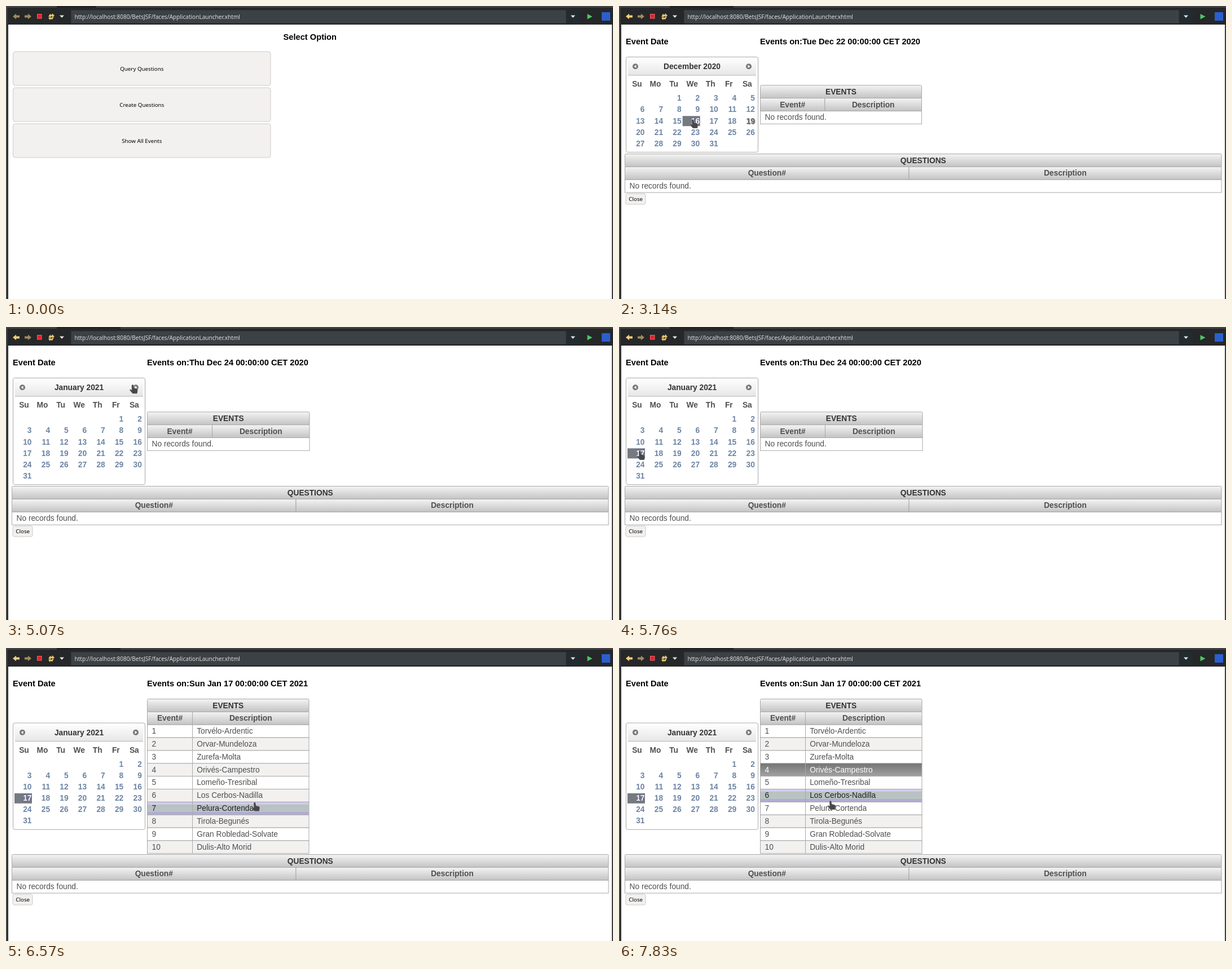
Write an HTML page that moves like this. It is 1076 px wide and 520 px high and loops after 8000 ms.

```html
<!DOCTYPE html>
<html lang="en">
<head>
<meta charset="utf-8">
<style>
html, body { margin: 0; width: 100%; height: 100%; overflow: hidden; background: #fff; }
svg { display: block; width: 1076px; height: 520px; }
text { font: 13.75px "Liberation Sans", Arial, sans-serif; fill: #4f4f4f; white-space: pre; }
.b { font-weight: bold; }
.h { font-weight: bold; font-size: 14.667px; fill: #000; }
.title { font-weight: bold; fill: #333; }
.ui { font: 9.78px "Noto Sans", sans-serif; fill: #000; }
.url { font: 10.07px "Noto Sans", sans-serif; fill: #dcdddd; }
.day { font-weight: bold; fill: #6c84a4; }
.today { font-weight: bold; fill: #626b70; text-shadow: 1px 1px 1px #888; }
.on { font-weight: bold; fill: #fff; text-shadow: 0 0 2px #4a3fa0; }
.hot { fill: #222; }
.sel { fill: #fff; }
</style>
</head>
<body>
<svg viewBox="0 0 1076 520">
  <defs>
    <linearGradient id="bar" x2="0" y2="1"><stop stop-color="#f4f4f4"/><stop offset="1" stop-color="#c3c3c3"/></linearGradient>
    <linearGradient id="soft" x2="0" y2="1"><stop stop-color="#fdfdfd"/><stop offset="1" stop-color="#e6e6e6"/></linearGradient>
    <linearGradient id="hover" x2="0" y2="1">
      <stop stop-color="#d6d0f3"/><stop offset=".2" stop-color="#cdc9ea"/><stop offset=".2" stop-color="#b8c2c1"/>
      <stop offset=".76" stop-color="#bac3c3"/><stop offset=".76" stop-color="#b0abd4"/><stop offset="1" stop-color="#b0abd6"/>
    </linearGradient>
    <linearGradient id="picked" x2="0" y2="1"><stop stop-color="#747474"/><stop offset="1" stop-color="#a2a2a2"/></linearGradient>
  </defs>
  <rect width="1076" height="520" fill="#fff"/>
  <rect width="1076" height="33" fill="#252729"/>
  <rect width="1076" height="3" fill="#3f4143"/>
  <rect id="tab" x="90" width="70" height="3" fill="#222426"/>
  <path d="M0 0h2v520H0zM1075 33h1v487h-1z" fill="#47494b"/>
  <path d="M2 3h2v517H2zM1074 33h1v487h-1z" fill="#292b2d"/>
  <path id="back" d="M12 18.500l6-5v3h6v4h-6v3z" fill="#a08a5c"/>
  <path d="M45 18.500l-6-5v3h-6v4h6v3z" fill="#a08a5c"/>
  <rect x="55.500" y="14.500" width="7.500" height="7.500" fill="#e8202a" stroke="#f0666a"/>
  <path d="M75 19l3-5 3 2 1-3 4 4-4 3v-2l-3 1zM85 19l-3 5-3-1-1 2-3-4 4-2v2l3-1z" fill="#e8c56c"/>
  <path d="M95 16.500h8l-4 4.500z" fill="#e4e4e4"/>
  <rect x="115.500" y="7.500" width="877" height="23" fill="#3c4146" stroke="#34383c"/>
  <rect x="993" y="7" width="24" height="24" fill="#222b30"/>
  <path d="M1001 16.500h8l-4 4.500z" fill="#e4e4e4"/>
  <text class="url" x="121.500" y="22.500">http://localhost:8080/BetsJSF/faces/ApplicationLauncher.xhtml</text>
  <path d="M1030.500 14l9 4.700-9 4.700z" fill="#4cc764"/>
  <rect id="busy" x="1056" y="11" width="15" height="15"/>
  <g id="page"></g>
  <path id="hand" d="M-2 1q2-2 3.500 0l.8 5 5 1.200q2 .6 1.700 2.600l-1 6.200h-8l-4.500-5q-1.600-2-.4-2.600 1-.5 3.200 1.400z" fill="#474747" stroke="#fff" stroke-opacity=".45" stroke-width=".6"/>
</svg>
<script>
const LOOP = 8000, ROW = 22.85, LINE = '#a8a8a8';
const $ = id => document.getElementById(id);

const matches = ['Torvélo-Ardentic', 'Orvar-Mundeloza', 'Zurefa-Molta', 'Orivés-Campestro', 'Lomeño-Tresribal',
  'Los Cerbos-Nadilla', 'Pelura-Cortenda', 'Tirola-Begunés', 'Gran Robledad-Solvate', 'Dulis-Alto Morid'];

// Pointer path: time, x, y of the fingertip
const path = [
  [780, 268, 158], [820, 211, 110], [1380, 211, 110], [1940, 77, 250], [2130, 67, 264],
  [2200, 67, 264], [2340, 102, 221], [2460, 102, 221], [2620, 126, 204],
  [2840, 126, 204], [2920, 131, 201], [3140, 131, 201], [3260, 134, 202], [3610, 167, 225],
  [3960, 167, 225], [4130, 349, 234], [4350, 349, 234], [4700, 220, 93], [4850, 225, 102],
  [5070, 225, 102], [5520, 37, 220], [5860, 37, 220], [6130, 402, 205], [6520, 441, 273.5],
  [6570, 441, 273.5], [6780, 428, 324], [7120, 404, 146], [7330, 404, 146], [7410, 400, 222],
  [7620, 400, 222], [7830, 375, 271]
];

// Calendar states: time, month, active day, date shown
const states = [
  [1980, 0, 0, ''], [2380, 0, 22, ''], [2470, 0, 22, 'Tue Dec 22'], [3140, 0, 16, 'Tue Dec 22'],
  [3230, 0, 16, 'Wed Dec 16'], [3960, 0, 24, 'Wed Dec 16'], [4050, 0, 24, 'Thu Dec 24'],
  [5070, 1, 0, 'Thu Dec 24'], [5760, 1, 17, 'Thu Dec 24'], [5880, 1, 17, 'Sun Jan 17']
];
const months = [{ name: 'December 2020', first: 2, rows: 5 }, { name: 'January 2021', first: 5, rows: 6 }];
const dateWidth = { Tue: 286, Wed: 291, Thu: 287.5, Sun: 286.5 };

const text = (s, x, y, cls = '', anchor = 'start') =>
  `<text x="${x}" y="${y}" class="${cls}" text-anchor="${anchor}">${s}</text>`;
const mid = (s, x, y, cls) => text(s, x, y, cls, 'middle');
const rect = (x, y, w, h, fill, stroke = 'none', r = 0) =>
  `<rect x="${x}" y="${y}" width="${w}" height="${h}" fill="${fill}" stroke="${stroke}" rx="${r}"/>`;

function pointer(t) {
  if (t < path[0][0]) return null;
  const i = path.findIndex(p => p[0] > t);
  if (i < 0) return path[path.length - 1].slice(1);
  const [t0, x0, y0] = path[i - 1], [t1, x1, y1] = path[i];
  const k = (t - t0) / (t1 - t0);
  return [x0 + (x1 - x0) * k, y0 + (y1 - y0) * k];
}

function menu(focus) {
  let s = mid('Select Option', 538.8, 59.5, 'h');
  ['Query Questions', 'Create Questions', 'Show All Events'].forEach((label, i) => {
    const y = 81 + 64 * i, lit = focus && !i;
    s += rect(12.5, y, 456.5, 60, lit ? '#f9f9f9' : '#f2f1f0', '#cec9c5', 4);
    if (lit) s += rect(14, y + 1.5, 453.5, 57, 'none', '#d2cfcc', 2);
    s += mid(label, 240.8, y + 34.3, 'ui');
  });
  return s;
}

function head(x, y, w, split, title, cols) {
  return rect(x, y, w, ROW, 'url(#bar)', LINE, 2) + mid(title, x + w / 2, y + 16, 'title') +
    rect(x, y + ROW, split, ROW, 'url(#bar)', LINE) +
    rect(x + split, y + ROW, w - split, ROW, 'url(#bar)', LINE) +
    mid(cols[0], x + split / 2, y + ROW + 16, 'b') +
    mid(cols[1], x + (w + split) / 2, y + ROW + 16, 'b');
}

function emptyTable(x, y, w, split, title, cols) {
  return head(x, y, w, split, title, cols) + rect(x, y + 2 * ROW, w, ROW, '#fff', LINE) +
    text('No records found.', x + 8, y + 2 * ROW + 15.8);
}

function eventTable(x, y, w, hot, picked) {
  let s = head(x, y, w, 80, 'EVENTS', ['Event#', 'Description']);
  matches.forEach((m, i) => {
    const ry = y + ROW * (i + 2);
    const cls = i === picked ? 'sel' : i === hot ? 'hot' : '';
    const fill = cls === 'sel' ? 'url(#picked)' : cls ? 'url(#hover)' : i % 2 ? '#f2f1f0' : '#fff';
    s += rect(x, ry, w, ROW, fill, LINE) + `<path d="M${x + 80} ${ry}v${ROW}" stroke="${LINE}"/>` +
      text(i + 1, x + 8, ry + 15.8, cls) + text(m, x + 87.7, ry + 15.8, cls);
  });
  return s;
}

function calendar(y, month, active) {
  const { name, first, rows } = months[month];
  let s = rect(12.5, y, 234, 68.5 + 20.1 * rows, '#fff', LINE, 3) +
    rect(16, y + 3.5, 227, 29, 'url(#soft)') +
    `<path d="M16 ${y + 32.5}h227" stroke="#b4b4b4"/>` + mid(name, 129.5, y + 21.8, 'title');
  [[29, -1], [230, 1]].forEach(([x, d]) => {
    s += `<circle cx="${x}" cy="${y + 16.8}" r="5" fill="#787878"/>` +
      `<path d="M${x + 2.5 * d} ${y + 16.8}l${-4 * d} -2.800v5.600z" fill="#fff"/>`;
  });
  ['Su', 'Mo', 'Tu', 'We', 'Th', 'Fr', 'Sa'].forEach((d, i) => s += mid(d, 32 + 32.55 * i, y + 52.6, 'b'));
  for (let d = 1; d < 32; d++) {
    const n = d + first - 1, x = 16 + 32.55 * (n % 7), cy = y + 73 + 20.1 * Math.floor(n / 7);
    const on = d === active;
    if (on) s += rect(x - 1, cy - 8.5, 31, 18, '#757a82');
    s += text(d, x + 29.5, cy + 4.8, on ? 'on' : !month && d === 19 ? 'today' : 'day', 'end');
  }
  return s;
}

function query([, month, active, date], hot, picked) {
  const full = date.startsWith('Sun');
  const calH = 68.5 + 20.1 * months[month].rows;
  const bodyH = full ? ROW * 12 : calH;
  const w = date ? dateWidth[date.slice(0, 3)] : 155;
  const stamp = date && `${date} 00:00:00 CET ${full ? 2021 : 2020}`;
  const qy = 90.5 + bodyH + (full ? 1.8 : 3);
  return text('Event Date', 12, 67.7, 'h') + text('Events on:' + stamp, 250, 67.7, 'h') +
    calendar(90.5 + (bodyH - calH) / 2, month, active) +
    (full ? eventTable(250.5, 90.5, w, hot, picked)
      : emptyTable(250.5, 90.5 + (bodyH - 3 * ROW) / 2, w, w * .4, 'EVENTS', ['Event#', 'Description'])) +
    emptyTable(10.5, qy, 1057.5, 503.5, 'QUESTIONS', ['Question#', 'Description']) +
    rect(12, qy + 70.5, 35, 19, '#f2f1f0', '#cec9c5', 3) + mid('Close', 29.7, qy + 83.5, 'ui');
}

let shown = '';
function draw(t) {
  const at = pointer(t);
  const state = states.filter(s => s[0] <= t).pop();
  const row = at && at[0] > 250 && at[0] < 537 ? Math.floor((at[1] - 90.5) / ROW) - 2 : -1;
  const picked = t >= 7610 ? 3 : -1;
  const loading = t >= 1230 && t < 1980;
  const key = [state, row, picked, loading].join();
  if (key !== shown) {
    $('page').innerHTML = state ? query(state, row, picked) : menu(loading);
    shown = key;
  }
  $('tab').setAttribute('width', t < 1900 ? 70 : 113);
  $('back').setAttribute('fill', state ? '#f6cd7c' : '#a08a5c');
  $('busy').setAttribute('fill', loading ? '#8fb4ea' : '#2b5fd0');
  $('hand').style.display = at ? '' : 'none';
  if (at) $('hand').setAttribute('transform', `translate(${at[0].toFixed(2)} ${at[1].toFixed(2)})`);
}

const start = performance.now();
function tick(now) {
  draw(Math.max(0, now - start) % LOOP);
  requestAnimationFrame(tick);
}
draw(0);
requestAnimationFrame(tick);
</script>
</body>
</html>
```
